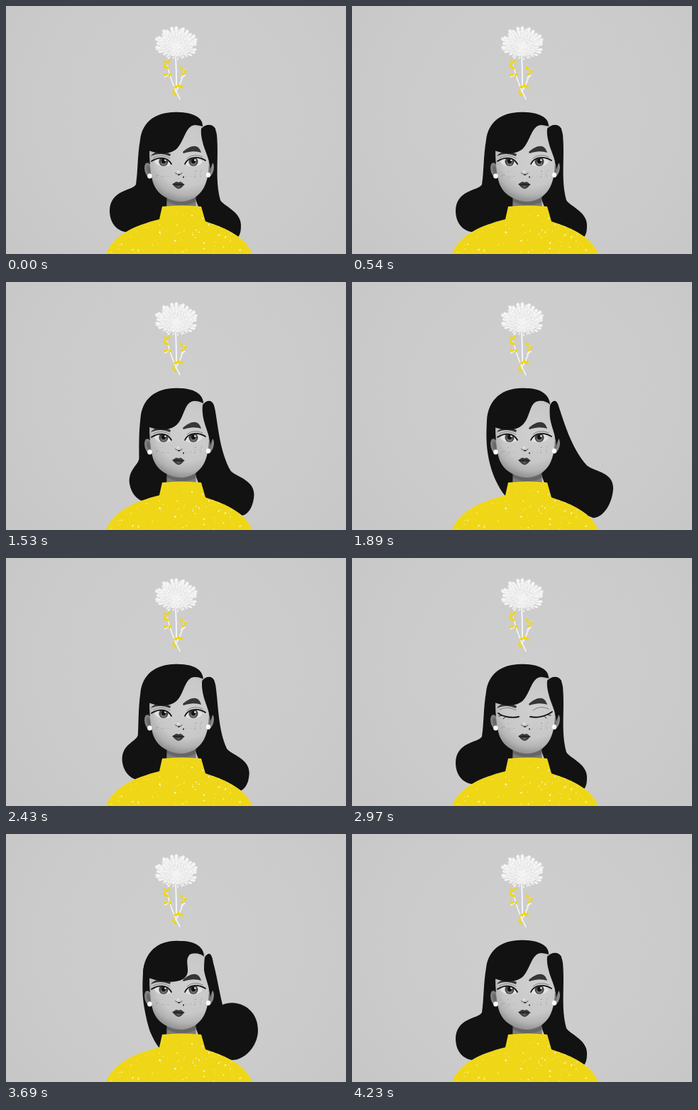
Recreate the animation shown at these times as an HTML page with a canvas. Size 479 px wide and 350 px high, loop 4.32 s.

```html
<!DOCTYPE html>
<html lang="en">
<head>
<meta charset="utf-8">
<title>Portrait with flower</title>
<style>
html, body { margin: 0; width: 100%; height: 100%; overflow: hidden; background: #c9c9c9; }
canvas { display: block; }
</style>
</head>
<body>
<canvas id="stage" width="479" height="350"></canvas>
<script>
const c = document.getElementById('stage').getContext('2d');
const LOOP = 4320, STEP = 90;
const INK = '#121212', YELLOW = '#efd717';

// Each lock of hair: at rest, blown out, curled up.
const leftHair = [
  'M245 150C213 148 192 162 189 189C185 212 186 232 183 252C178 261 146 259 146 290C147 312 162 320 174 319L218 303L250 270Z',
  'M245 150C214 148 192 164 190 195C189 215 189 230 192 246C194 258 198 270 202 279C206 288 211 296 216 302L220 303L250 270Z',
  'M245 151C216 149 195 165 193 196C192 215 192 230 195 246C197 258 200 270 203 279C207 288 211 296 216 302L220 303L250 270Z'];
const rightHair = [
  'M275 173C284 165 295 166 297 182C300 215 294 245 302 274C306 282 331 290 331 309C331 318 330 322 327 326L280 308L266 270Z',
  'M279 174C284 165 289 166 292 178C298 195 309 235 331 259C342 268 368 268 368 291C367 312 355 332 340 333L280 308L266 270Z',
  'M280 174C285 167 290 167 292 182C296 195 300 220 305 241C325 232 355 245 355 277C355 300 335 320 318 319L280 308L266 270Z'];
const clump = [
  'M275 173C281 167 290 165 295 173L297 205L288 230C286 213 280 205 277 192Q274 181 275 173Z',
  'M279 174C282 168 287 164 290 173L297 205L288 230C286 213 281 205 279 192Q278 181 279 174Z',
  'M280 174C283 169 288 166 290 174L296 205L288 230C286 213 281 205 279 192Q279 181 280 174Z'];
const fringe = [
  'M277 170C278 157 262 150 243 150C211 150 192 164 190 190C190 198 194 203 204 205C218 210 233 209 241 201C251 191 253 169 266 168C270 168 274 169 277 170Z',
  'M279 173C278 158 265 150 245 150C213 150 193 165 191 193C191 200 196 204 204 206C218 210 232 210 241 201C252 190 249 170 263 168C269 167 275 169 279 173Z',
  'M279 173C279 159 266 151 246 151C216 151 195 167 193 196C194 201 198 203 204 204C218 209 238 211 249 205C264 196 249 180 259 170C266 167 275 169 279 173Z'];

const lerp = (a, b, k) => a + (b - a) * k;

function mix(a, b, k) {
  const nums = b.match(/\d+(\.\d+)?/g);
  let i = 0;
  return a.replace(/\d+(\.\d+)?/g, n => lerp(+n, +nums[i++], k).toFixed(2));
}

const pose = (shapes, blow, curl) => mix(mix(shapes[0], shapes[1], blow), shapes[2], curl);

// Eased value through [time, value] keys.
function track(t, keys) {
  for (let i = 1; i < keys.length; i++) {
    const [t0, v0] = keys[i - 1], [t1, v1] = keys[i];
    if (t <= t1) {
      const k = (t - t0) / (t1 - t0);
      return lerp(v0, v1, k * k * (3 - 2 * k));
    }
  }
  return keys[keys.length - 1][1];
}

function seeded(seed) {
  return () => (seed = seed * 16807 % 2147483647) / 2147483647;
}

function fill(d, style) {
  c.fillStyle = style;
  c.fill(new Path2D(d));
}

function line(d, style, width) {
  c.strokeStyle = style;
  c.lineWidth = width;
  c.stroke(new Path2D(d));
}

function oval(x, y, rx, ry, style, turn = 0) {
  c.beginPath();
  c.ellipse(x, y, rx, ry, turn, 0, 7);
  c.fillStyle = style;
  c.fill();
}

function glow(x, y, r, ...stops) {
  const g = c.createRadialGradient(x, y, 0, x, y, r);
  stops.forEach(([at, col]) => g.addColorStop(at, col));
  return g;
}

function background() {
  c.fillStyle = glow(250, 150, 330, [0, '#cecece'], [.6, '#cbcbcb'], [1, '#c6c6c6']);
  c.fillRect(0, 0, 479, 350);
}

function flower() {
  const rnd = seeded(41);
  c.lineCap = 'round';
  line('M239 72C240 88 240 102 240 112', '#f5f5f5', 2);
  line('M227 84C231 98 235 114 245 131M251 90C249 102 245 112 239 121M230 97L224 100M247 101L252 98', '#f3f3f3', 1.7);
  oval(240, 53, 24, 18, '#f3f3f3');
  for (const [size, count] of [[1, 30], [.82, 24], [.62, 18], [.4, 11]]) {
    for (let i = 0; i < count; i++) {
      const a = (i + rnd() * .7) / count * Math.PI * 2;
      const k = size * (.9 + rnd() * .15);
      const x = 240 + 30 * k * Math.cos(a), y = 53 + 23.5 * k * Math.sin(a);
      const bx = lerp(x, 240, .4), by = lerp(y, 63, .4);
      const dx = (y - by) * .36, dy = (bx - x) * .36;
      const d = `M${bx} ${by}Q${x + dx} ${y + dy} ${x} ${y}Q${x - dx} ${y - dy} ${bx} ${by}`;
      fill(d, '#f6f6f6');
      line(d, '#d6d6d6', .45);
    }
  }
  const leaves = [[225, 79], [229, 78], [223, 85], [227, 87], [225, 97], [231, 97], [247, 88],
    [252, 92], [249, 96], [243, 112], [247, 114], [239, 114], [236, 121], [238, 125]];
  leaves.forEach(([x, y], i) => oval(x, y, 3, 1.7, YELLOW, i * 2.2 + .5));
}

function head() {
  fill('M227 260L226 290L268 290L267 260Z', '#7c7c7c');
  fill('M227 266Q246 286 267 266L267 277Q246 286 227 276Z', '#666');
  oval(201, 232, 5.5, 11, '#818181', -.25);
  oval(287, 231, 5.5, 11, '#8b8b8b', .25);
  oval(201, 231, 2.5, 6, '#696969', -.2);
  oval(287, 230, 2.5, 6, '#707070', .2);
  const skin = glow(254, 212, 68, [0, '#cfcfcf'], [.62, '#c8c8c8'], [.8, '#b4b4b4'], [1, '#858585']);
  fill('M202 202C209 172 250 162 280 168L286 208C286 222 286 236 283 245C278 266 262 276 246 276C227 275 210 264 206 245C203 232 202 217 202 202Z', skin);
  oval(202.5, 240, 3.3, 3.5, '#fafafa');
  oval(285, 238.5, 3.1, 3.4, '#fafafa');

  fill('M204 212C209 204 222 203 232 209L231 212C221 208 213 208 204 212Z', '#363636');
  fill('M249 206C257 199 264 196 270 199C273 201 274 204 275 207C269 205 261 204 250 208Z', '#363636');
}

function features() {
  const rnd = seeded(17);
  for (let i = 0; i < 22; i++) {
    const side = i % 2 ? 266 : 222;
    oval(side + (rnd() - .5) * 24, 237 + (rnd() - .5) * 10, .5, .5, '#8c8c8c');
  }
  line('M238.5 235.5Q239 237.5 241 237M245 237.5Q247.5 237.5 248 235.5', '#555', 1);
  oval(243.5, 238, 2, .9, '#333');
  oval(242.5, 233.8, 1.5, 1.3, '#ececec');
  oval(250, 241.5, 1, 1, INK);
  fill('M234.5 251.5C237 250 239.5 247 242 248.5Q243 249.2 244.5 248.5C247 247 248.5 250 251 252C248 256 246 258 242.5 258C239 257 236.5 254 234.5 251.5Z', '#3c3c3c');
  line('M235 251.5Q239 252.5 243 251.5Q247 252.5 251 252', INK, 1);
  oval(243, 255, 2.5, .8, '#747474');
}

function eye(shape, x, lash, shut, shutLash, crease, open) {
  c.lineCap = 'round';
  if (open > .15) {
    c.save();
    c.translate(0, 224);
    c.scale(1, open);
    c.translate(0, -224);
    c.save();
    c.clip(new Path2D(shape));
    c.fillStyle = '#e2e2e2';
    c.fillRect(x - 20, 208, 40, 24);
    oval(x, 219.5, 6.5, 6.8, '#444');
    oval(x, 221.5, 4.3, 4, '#6c6c6c');
    oval(x, 219, 3, 3.3, INK);
    oval(x + 2.4, 217.5, 1.3, 1.3, '#fff');
    c.restore();
    line(lash, INK, 1.8);
    c.restore();
  } else {
    line(shut, INK, 1.8);
    line(shutLash, INK, .9);
  }
  line(crease, '#777', .9);
}

function eyes(open) {
  eye('M209 220C214 213 226 212 232 224C225 229 214 227 209 220Z', 222,
    'M205 219C214 213 227 212 233 223',
    'M206 219C214 225 226 226 235 224', 'M211 222L207 223M216 224.5L213 227',
    'M208 214Q220 208 231 215', open);
  eye('M253 224C258 212 271 212 277 220C272 227 262 229 253 224Z', 264,
    'M252 223C257 212 271 212 281 218',
    'M251 224C260 226 272 224 282 217', 'M276 221.5L280 222M271 223.5L274 226',
    'M255 215Q265 207 277 213', open);
}

function sweater() {
  const body = 'M220 283Q248 280 275 283L281 304C313 314 338 327 347 350L141 350C150 324 180 310 216 301Z';
  fill(body, YELLOW);
  c.save();
  c.clip(new Path2D(body));
  const rnd = seeded(93);
  for (let i = 0; i < 190; i++) {
    const x = 145 + rnd() * 200, y = 286 + rnd() * 64, r = .3 + rnd() ** 3 * .9;
    oval(x, y, r, r, i % 3 ? '#fff7b5' : '#ffffff');
  }
  c.restore();
}

function draw(t) {
  const blow = track(t, [[0, 0], [1260, 0], [1800, 1], [1980, 1], [2700, 0]]);
  const curl = track(t, [[0, 0], [3240, 0], [3600, 1], [3780, 1], [4140, 0]]);
  const open = track(t, [[0, 1], [2700, 1], [2880, 0], [3060, 0], [3240, 1]]);
  const hair = shapes => fill(pose(shapes, blow, curl), INK);
  background();
  flower();
  hair(leftHair);
  hair(rightHair);
  head();
  features();
  eyes(open);
  hair(fringe);
  hair(clump);
  sweater();
}

const start = performance.now();
function tick() {
  const t = (performance.now() - start) % LOOP;
  draw(Math.floor(t / STEP) * STEP);
  requestAnimationFrame(tick);
}
tick();
</script>
</body>
</html>
```
